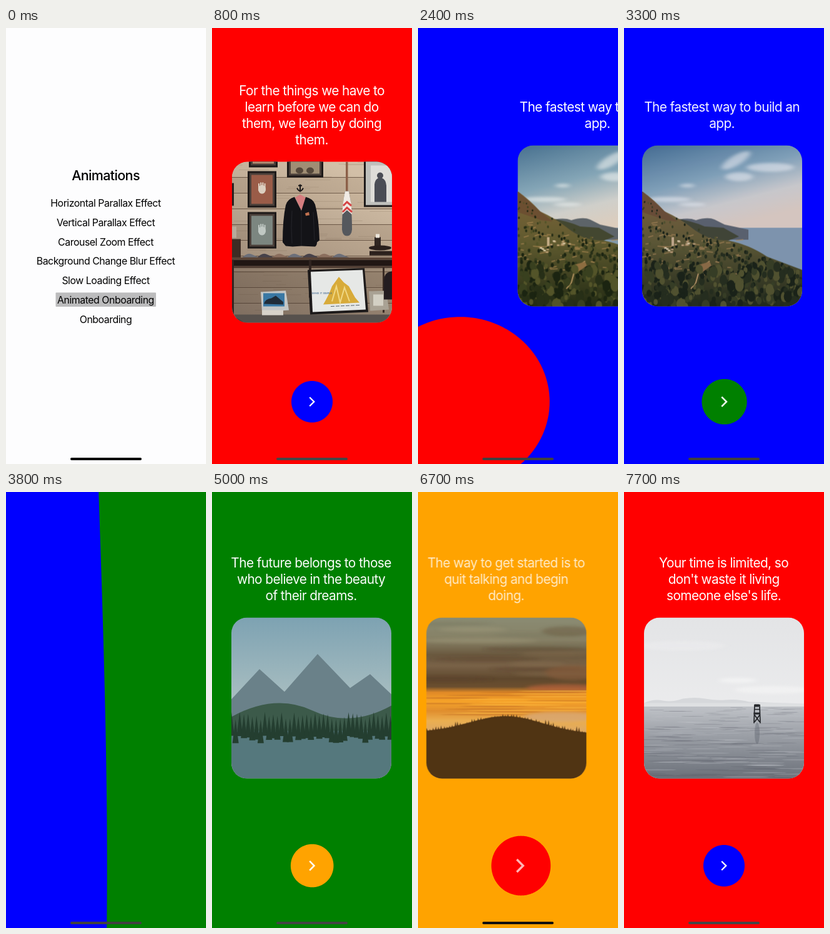
These frames come from a looping animation (320 px wide and 693 px high, 8000 ms). An HTML page:

```html
<!DOCTYPE html>
<html lang="en">
<head>
<meta charset="utf-8">
<title>Animated Onboarding</title>
<style>
html, body { margin: 0; width: 100%; height: 100%; overflow: hidden; background: #fdfdfe; }
svg { display: block; width: 320px; height: 693px; font-family: Inter, "Noto Sans", sans-serif; }
text { text-anchor: middle; }
.title { font-size: 21.5px; font-weight: 500; letter-spacing: -.03em; }
.row { font-size: 15.9px; letter-spacing: -.03em; }
.quote { font-size: 20.8px; letter-spacing: -.028em; fill: #fff; }
</style>
</head>
<body>
<svg viewBox="0 0 320 693">
  <defs>
    <clipPath id="card"><rect width="256" height="256" rx="25"/></clipPath>
    <clipPath id="stage"><rect width="320" height="693"/></clipPath>
    <linearGradient id="shade" x1=".6" x2=".2" y2="1">
      <stop stop-color="#3a2418" stop-opacity="0"/><stop offset="1" stop-color="#2a1c1c" stop-opacity=".38"/>
    </linearGradient>
    <linearGradient id="coastSky" x2=".25" y2="1">
      <stop stop-color="#47708f"/><stop offset=".28" stop-color="#84a5b6"/>
      <stop offset=".46" stop-color="#cfcfca"/><stop offset=".6" stop-color="#dccdbd"/>
    </linearGradient>
    <linearGradient id="coastLand" x2="0" y2="1">
      <stop stop-color="#80643a"/><stop offset=".45" stop-color="#5f5a2f"/><stop offset="1" stop-color="#232b14"/>
    </linearGradient>
    <linearGradient id="lakeSky" x2="0" y2="1">
      <stop stop-color="#7fa3b5"/><stop offset="1" stop-color="#d5dad2"/>
    </linearGradient>
    <linearGradient id="dusk" x2="0" y2="1">
      <stop stop-color="#6d8791"/><stop offset=".14" stop-color="#687880"/>
      <stop offset=".23" stop-color="#454750"/><stop offset=".3" stop-color="#57525a"/>
      <stop offset=".38" stop-color="#37323a"/><stop offset=".43" stop-color="#463a3b"/>
      <stop offset=".465" stop-color="#d98431"/><stop offset=".52" stop-color="#f3a334"/>
      <stop offset=".58" stop-color="#d98a3a"/><stop offset=".64" stop-color="#e6b265"/>
      <stop offset=".72" stop-color="#d3aa82"/>
    </linearGradient>
    <linearGradient id="fog" x2="0" y2="1">
      <stop stop-color="#e3e4e6"/><stop offset="1" stop-color="#f1f1f2"/>
    </linearGradient>
    <linearGradient id="sea" x2="0" y2="1">
      <stop stop-color="#bfc2c7"/><stop offset=".4" stop-color="#9b9fa6"/><stop offset="1" stop-color="#6b7079"/>
    </linearGradient>
    <filter id="soft"><feGaussianBlur stdDeviation="4 2"/></filter>
    <filter id="thin"><feGaussianBlur stdDeviation="3 .7"/></filter>
  </defs>

  <g id="menu">
    <rect width="320" height="693" fill="#fdfdfe"/>
    <rect x="79.5" y="420.5" width="160.5" height="22.5" rx="1" fill="#bcbcbd"/>
    <text class="title" x="159.5" y="241.5">Animations</text>
    <g id="rows"></g>
    <rect id="dim" width="320" height="693" opacity="0"/>
  </g>

  <g id="app" clip-path="url(#stage)">
    <rect id="bg" width="320" height="693"/>
    <path id="disc"/>
    <path id="arrow" d="M-3.8-7 3.2 0-3.8 7" fill="none" stroke="#fff" stroke-width="2.4"/>
    <g id="pages"></g>
  </g>
  <rect id="home" x="103" y="683" width="114" height="4" rx="2"/>
</svg>

<script>
const $ = id => document.getElementById(id);

function seeded(seed) {
  return () => (seed = (seed * 16807) % 2147483647) / 2147483647;
}
const many = (n, fn) => Array.from({ length: n }, (_, i) => fn(i)).join('');
const box = (x, y, w, h, fill, more = '') =>
  `<rect x="${x}" y="${y}" width="${w}" height="${h}" fill="${fill}" ${more}/>`;
const shape = (d, fill, more = '') => `<path d="${d}" fill="${fill}" ${more}/>`;
const oval = (x, y, rx, ry, fill, more = '') =>
  `<ellipse cx="${x}" cy="${y}" rx="${rx}" ry="${ry}" fill="${fill}" ${more}/>`;

function shop() {
  const rnd = seeded(11);
  const frame = (x, y, w, h, fill) => box(x, y, w, h, '#1d1918') +
    box(x + 3, y + 3, w - 6, h - 6, '#4b403a') + box(x + 6, y + 6, w - 12, h - 12, fill);
  const hand = (x, y, fill) => oval(x, y, 6, 7, fill) +
    many(4, i => box(x - 6 + i * 3.2, y - 12 + Math.abs(i - 1.5) * 1.5, 2, 12, fill, 'rx="1"'));
  return box(0, 0, 256, 256, '#c9b59d') +
    many(10, i => box(0, i * 25, 256, 24, ['#d2bfa7', '#c4b098', '#cdb9a0'][i % 3])) +
    many(60, () => box(rnd() * 230, rnd() * 245, 15 + rnd() * 40, .7, '#a08b75', 'opacity=".5"')) +
    many(9, i => box(0, 24.5 + i * 25, 256, 1, '#75614f')) +
    box(0, 168, 256, 76, '#60503f', 'opacity=".25"') +
    box(0, 0, 256, 256, 'url(#shade)') +
    frame(27, -8, 46, 17, '#b88c72') + frame(25, 15, 46, 58, '#9a5c48') + frame(25, 80, 46, 58, '#7c8680') +
    hand(48, 44, '#dccfc0') + hand(48, 110, '#c0c8c3') + box(0, 34, 3, 36, '#25201e') +
    frame(88, -10, 58, 35, '#a08e74') + oval(108, 14, 6, 5, '#55483b') + oval(125, 14, 6, 5, '#55483b') +
    box(211, -4, 46, 76, '#1e1b1b') + box(214, -1, 42, 70, '#bfc0bc') + box(222, 6, 34, 58, '#deddd8') +
    shape('M228 64V36q1-8 6-10a5 5 0 1 1 6 0q6 2 7 12V64Z', '#4a4d55') +
    shape('M109 36v12M104 42q5 9 10 0M106 38h6', 'none', 'stroke="#171516" stroke-width="2"') +
    shape('M101 57l8-5 9 5-6 22Z', '#d57d7f') +
    shape('M100 56Q89 59 86 69Q81 92 81 128l5 6 11 1 14-1 22 1q3-2 3-7l4-3Q139 90 133 68Q130 59 118 56L111 78Z', '#131317') +
    shape('M111 78v55M96 78q-2 28 0 52M130 80q1 24 2 45', 'none', 'stroke="#25252b"') +
    shape('M117 82l6-2 1 5-6 1Z', '#c1714f') +
    box(182, 0, 3.5, 55, '#8c6049') +
    shape('M181 47Q176 70 176 108q1 10 8 10t8-10Q192 70 187 47Z', '#55585d') +
    shape('M181 47Q177 65 176.5 84l7.5-7 8 7Q191 65 187 47Z', '#f0ebe4') +
    shape('M178 70l6-6 7 6M177 80l7-7 8 7', 'none', 'stroke="#d64646" stroke-width="3"') +
    box(0, 123, 14, 30, '#3d2c24') + box(0, 103, 7, 18, '#b7aa9a') +
    box(228, 120, 10, 14, '#302622') + box(230, 115, 6, 6, '#ece6dc') +
    oval(237, 137, 18, 4, '#2a201d') + box(220, 142, 36, 7, '#2c211d') +
    many(7, i => shape(`M${16 + i * 24} 153q8-9 15-6t14 6Z`, ['#6c6f79', '#47424a', '#8b6f5e'][i % 3])) +
    box(0, 152, 256, 4, '#5a4436') + box(0, 156, 256, 10, '#211714') + box(0, 166, 256, 3, '#4b382e') +
    box(0, 156, 3, 90, '#302420') + box(123, 156, 4, 60, '#302420') + box(241, 168, 3, 72, '#3a2c25') +
    box(0, 243, 256, 13, '#57514d') + shape('M0 256V244l20 12Z', '#3d3835') +
    shape('M121 172l91-3 6 70-93 4Z', '#1d1a1a') + shape('M126 175l83-3 5 63-85 4Z', '#e6e8e6') +
    shape('M146 227Q155 212 160 198L171 183l8 9 8 6 10 18 7 8Z', '#d8ab3a') +
    shape('M160 222l7-24 6 26 7-24 8 22', 'none', 'stroke="#f0d885" stroke-width="2"') +
    `<text x="144" y="210" font-size="4" fill="#315a86">MAKE IT SIMPLE</text>` +
    shape('M158 230l46-2', 'none', 'stroke="#56616b" stroke-dasharray="6 2"') +
    shape('M46 207l40-2 5 31-43 3Z', '#c3c6c5') + box(50, 209, 34, 21, '#3978a4') +
    shape('M51 226q2-8 12-9l7-4 12 10v4Z', '#202c38') + box(48, 236, 34, 8, '#d8d2c9') +
    shape('M219 206l28-1 4 30-30 2Z', '#a9a294') + box(226, 211, 16, 18, '#d3d0c4') +
    shape('M256 174q-13 2-13 15v30h13Z', '#241d20');
}

function coast() {
  const rnd = seeded(29);
  const ridge = x => 74 + x * .62 - Math.max(0, x - 75) * .2;
  const tints = ['#1b2411', '#272f17', '#39401f', '#535429'];
  const tree = (x, y, s) => oval(x, y, s * .7, s, tints[rnd() * 4 | 0]);
  return box(0, 0, 256, 256, 'url(#coastSky)') +
    `<g fill="#eef1ef" filter="url(#soft)" opacity=".6">` +
      oval(42, 86, 36, 4, '') + oval(72, 64, 12, 3, '') + oval(80, 94, 22, 3, '') +
      oval(150, 24, 26, 8, '', 'transform="rotate(-30 150 24)"') + oval(155, 50, 22, 7, '') +
      oval(205, 35, 38, 7, '') + `</g>` +
    box(110, 131, 146, 80, '#8299aa') +
    shape('M45 122Q70 113 86 119Q105 113 116 118L132 126 170 134V150H45Z', '#5d6469') +
    shape('M52 116Q80 120 100 129L130 131 155 145 120 158H50Z', '#434730') +
    shape('M0 73Q20 87 36 105Q60 116 78 130Q105 152 136 151Q170 157 200 177L256 198V256H0Z', 'url(#coastLand)') +
    shape('M0 73Q18 88 36 105l20 16-18-2L0 106Z', '#6c4f31') +
    many(60, () => {
      const x = rnd() * 150, y = 120 + x * .2 + rnd() * 70;
      return box(x, y, 4 + rnd() * 11, 1.5, '#b38d57', `opacity=".7" transform="rotate(${-20 + rnd() * 30} ${x} ${y})"`);
    }) +
    many(420, () => {
      const x = rnd() * 256, y = ridge(x) + 6 + rnd() * (240 - ridge(x));
      return tree(x, y, 1 + (y - 70) / 50);
    }) +
    shape('M108 184l-16 12-6 22-8 10', 'none', 'stroke="#b3935f" stroke-width="2"') +
    shape('M90 190l18-5 3 6-18 13Z', '#8d6d40') +
    many(14, i => box(35 + rnd() * 48, 150 + rnd() * 20, 4, 2.5, i % 3 ? '#b99c70' : '#d6c7a2')) +
    box(47, 146, 4, 14, '#c3ab85') +
    many(170, () => tree(rnd() * 256, 190 + rnd() * 66, 3 + rnd() * 7));
}

function lake() {
  const rnd = seeded(53);
  return box(0, 0, 256, 256, 'url(#lakeSky)') +
    shape('M0 130L45 82 85 118 138 58 190 112 222 90 256 122V180H0Z', '#6c828b') +
    shape('M0 158Q70 120 130 148T256 140V200H0Z', '#3d5a4b') +
    box(0, 180, 256, 76, '#57787f') +
    many(40, i => shape(`M${i * 6.7} ${150 + rnd() * 12}l5 38h-10Z`, '#253e31'));
}

function sunset() {
  const rnd = seeded(7);
  const hill = x => 182 - 26 * Math.exp(-(((x - 128) / 82) ** 2)) + 3 * (x / 256) ** 2;
  const pts = many(65, i => `L${i * 4} ${hill(i * 4).toFixed(1)}`);
  const streak = (y, h, fill, o) => oval(rnd() * 256, y, 40 + rnd() * 70, h, fill, `opacity="${o}"`);
  return box(0, 0, 256, 256, 'url(#dusk)') +
    `<g filter="url(#soft)">` +
      many(5, i => streak(10 + i * 9, 4, i % 2 ? '#90a0a1' : '#586b75', .35)) +
      many(7, i => streak(50 + i * 8, 4, i % 2 ? '#6a6064' : '#2d2b35', .4)) +
      oval(235, 88, 45, 12, '#66494a', 'opacity=".7"') + oval(225, 22, 40, 8, '#4c525b', 'opacity=".6"') +
      oval(220, 112, 60, 6, '#a5534a', 'opacity=".7"') +
      oval(215, 158, 60, 8, '#cfa993', 'opacity=".8"') + `</g>` +
    `<g filter="url(#thin)">` +
      many(18, i => streak(117 + i * 2.2, 1, i % 2 ? '#b5652f' : '#fdc050', .6)) + `</g>` +
    shape(`M0 256${pts}V256Z`, '#241819') +
    many(58, i => {
      const x = i * 4.5 + rnd() * 2, tall = Math.abs(x - 128) > 55 ? 8 : 4, h = rnd() * tall;
      return shape(`M${x} ${hill(x) - h}l2 ${h + 4}h-4Z`, '#241819');
    });
}

function fogSea() {
  const rnd = seeded(17);
  return box(0, 0, 256, 256, 'url(#fog)') +
    `<g filter="url(#soft)" opacity=".6">` + oval(60, 45, 70, 8, '#ececee') +
      oval(150, 100, 30, 4, '#f8f8f8') + oval(205, 115, 60, 6, '#f6f6f6') + `</g>` +
    shape('M0 136Q15 129 30 132T62 129Q82 126 98 129T130 131Q150 129 168 134L256 137V142H0Z', '#d6d8db') +
    box(0, 136, 256, 6, '#e5e6e8', 'opacity=".6"') +
    box(0, 141.5, 256, 115, 'url(#sea)') +
    many(190, () => {
      const y = 143 + rnd() ** 1.3 * 112, w = 6 + (y - 140) * .2 + rnd() * 12;
      return oval(rnd() * 256, y, w, .4 + (y - 140) / 190, rnd() < .5 ? '#5c626c' : '#c0c4ca', 'opacity=".3"');
    }) +
    oval(181, 184, 4, 17, '#555b64', 'opacity=".35"') +
    shape('M176 168l1-29h8l1 29M176 153h9M176 146h9M177 155l8 11M185 155l-8 11', 'none', 'stroke="#202226" stroke-width="1.7"') +
    box(177, 138, 7, 4, '#25272b') + box(175.5, 151, 10, 3, '#25272b');
}

const pages = [
  [['For the things we have to', 'learn before we can do', 'them, we learn by doing', 'them.'], shop],
  [['The fastest way to build an', 'app.'], coast],
  [['The future belongs to those', 'who believe in the beauty', 'of their dreams.'], lake],
  [['The way to get started is to', 'quit talking and begin', 'doing.'], sunset],
  [['Your time is limited, so', "don't waste it living", "someone else's life."], fogSea]
];
const LINE = 26;
$('pages').innerHTML = pages.map(([lines, art]) => {
  const top = 160.5 + lines.length * LINE / 2;
  const text = lines.map((s, i) =>
    `<text class="quote" x="159.6" y="${top - 106 + (i - lines.length + 4) * LINE}">${s}</text>`).join('');
  return `<g>${text}<g transform="translate(32 ${top})" clip-path="url(#card)">${art()}</g></g>`;
}).join('');

$('rows').innerHTML = ['Horizontal Parallax Effect', 'Vertical Parallax Effect', 'Carousel Zoom Effect',
  'Background Change Blur Effect', 'Slow Loading Effect', 'Animated Onboarding', 'Onboarding']
  .map((s, i) => `<text class="row" x="159.5" y="${284.3 + i * 30.7}">${s}</text>`).join('');

const LOOP = 8000, FLIP = 1100, STARTS = [1641, 3247, 4969, 6568];
const COLORS = ['#ff0000', '#0000ff', '#008000', '#ffa300'];
const BARS = [70, 62, 68, 14];
const color = i => COLORS[i % 4];
const views = [...$('pages').children];

function easeInOut(x) {
  if (x >= 1) return 1;
  let lo = 0, hi = 1, u;
  for (let i = 0; i < 24; i++) {
    u = (lo + hi) / 2;
    const at = 3 * (1 - u) ** 2 * u * .42 + 3 * (1 - u) * u * u * .58 + u ** 3;
    if (at < x) lo = u; else hi = u;
  }
  return 3 * (1 - u) * u * u + u ** 3;
}

// A disc turned about its vertical axis and seen in perspective; dir is the side of the far edge.
function drawDisc(deg, dir, fill) {
  const a = deg * Math.PI / 180, r = 33 + 3.58 * deg ** .83;
  const k = Math.sin(a) / .905, c = Math.cos(a);
  const end = k < 1 ? Math.PI : Math.acos(-.999 / k);
  const pts = [];
  for (let i = -160; i <= 160; i++) {
    const f = end * i / 160, z = 1 + k * Math.cos(f);
    pts.push([160 + dir * r * Math.cos(f) * c / z, 594 + r * Math.sin(f) / z]);
  }
  if (k >= 1) {
    const x = 160 - dir * 9000;
    pts.push([x, pts[320][1]], [x, pts[0][1]]);
  }
  $('disc').setAttribute('d', 'M' + pts.map(p => p.map(v => v.toFixed(2)).join(' ')).join('L') + 'Z');
  $('disc').setAttribute('fill', fill);
  const shift = k < 1 ? -dir * .75 * r * c * k / (1 - k * k) : 0;
  $('arrow').setAttribute('transform', `translate(${160 + shift} 594) scale(${r / 33})`);
}

function draw(t) {
  const s = Math.max(0, t - 150) * .014;
  const push = Math.min(1, (1 - (1 + s) * Math.exp(-s)) * 1.002);
  $('menu').setAttribute('transform', `translate(${-96 * push} 0)`);
  $('dim').setAttribute('opacity', .1 * push);
  $('app').setAttribute('transform', `translate(${320 * (1 - push)} 0)`);

  const i = STARTS.filter(v => v <= t).length - 1;
  const p = i < 0 ? 1 : easeInOut((t - STARTS[i]) / FLIP);
  const late = p >= .5, now = late ? i + 1 : i, left = late ? 1 - p : p;
  const fade = Math.max(0, 1 - 7 * left);
  $('bg').setAttribute('fill', color(now));
  drawDisc(180 * left, late ? 1 : -1, color(late && p < .985 ? i : now + 1));
  $('arrow').setAttribute('opacity', Math.max(0, 1 - 10 * left));
  views.forEach((v, n) => {
    v.style.display = n === now ? '' : 'none';
    if (n !== now) return;
    v.setAttribute('transform', `translate(${late ? 640 * left : -640 * left} 0)`);
    v.setAttribute('opacity', late ? 1 : fade);
  });
  const bar = i < 0 ? BARS[0] * push : BARS[i % 4] + (BARS[(i + 1) % 4] - BARS[i % 4]) * p;
  $('home').setAttribute('fill', `rgb(${bar},${bar},${bar})`);
}

function tick() {
  draw(performance.now() % LOOP);
  requestAnimationFrame(tick);
}
tick();
</script>
</body>
</html>
```
